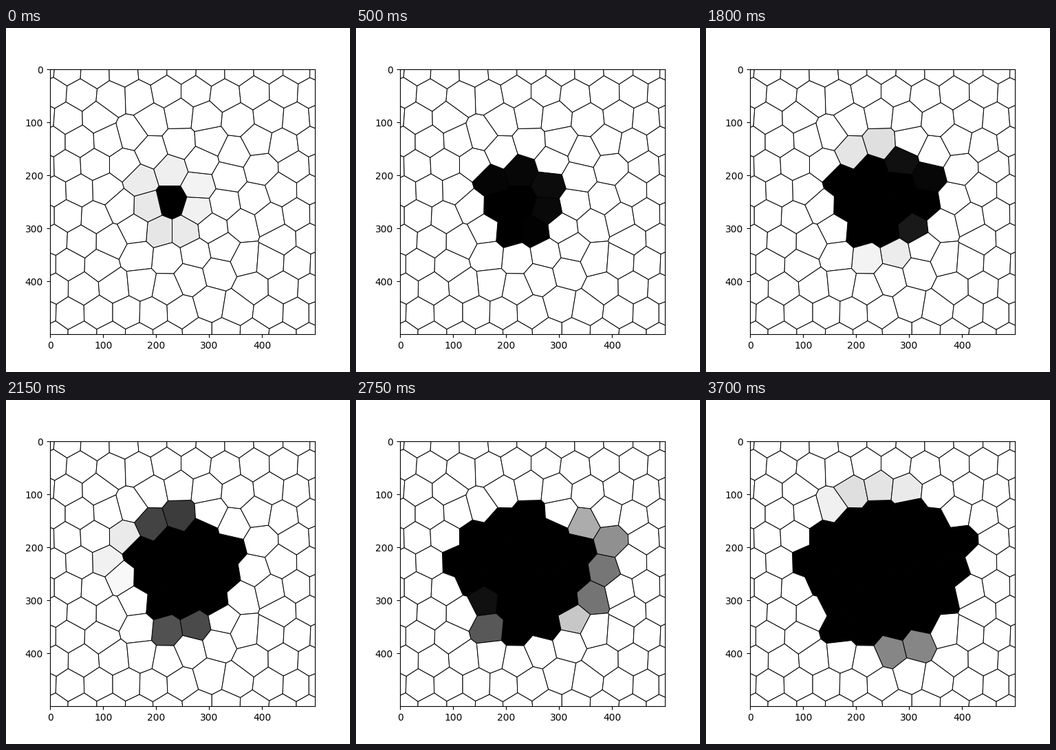
These frames come from a looping animation (500x500 px, 3750 ms). A matplotlib script:

```python
import numpy as np
import matplotlib.pyplot as plt
from matplotlib.animation import FuncAnimation
from matplotlib.collections import PolyCollection

FRAMES, STEP = 75, 50
FADE = 11              # frames a cell needs to turn black
HOLD = (10, 26)        # the growth rests between these frames
LEFT, TOP, SCALE = 63.75, 60, 0.77
PITCH, ROW = 42, 36    # spacing of the loose honeycomb

# waves of growth: first start frame, delay from cell to cell, cell centres
WAVES = [
    (-20, 0, [(240, 252)]),
    (-1.1, 0.1, [(223, 296), (206, 260), (260, 296), (195, 221),
                 (240, 207), (278, 264), (280, 229)]),
    (24.9, 0.4, [(318, 256), (324, 216), (284, 193), (300, 291)]),
    (34.6, 0.3, [(253, 167), (211, 180), (276, 328), (234, 335)]),
    (42.1, 0.3, [(172, 198), (145, 235), (166, 259)]),
    (44.7, 3.1, [(187, 293), (192, 331)]),
    (49.0, 0.1, [(344, 286), (361, 249)]),
    (50.2, 1.2, [(370, 204), (332, 181), (316, 320)]),
    (55.3, 0, [(297, 164)]),
    (68.8, 0, [(267, 364), (309, 354)]),
    (72.6, 0.25, [(212, 133), (252, 125), (290, 129), (182, 154)]),
]


def distances(a, b):
    return np.hypot(a[:, None, 0] - b[None, :, 0], a[:, None, 1] - b[None, :, 1])


def honeycomb(fixed, rng):
    """Jittered honeycomb that leaves room for the fixed cells."""
    pts = np.array([(214 + PITCH * (i + j % 2 / 2), 128 + ROW * j)
                    for j in range(-3, 11) for i in range(-5, 8)], float)
    pts += rng.normal(0, 4, pts.shape)
    return pts[distances(pts, fixed).min(axis=1) > 30]


def relax(fixed, loose, rounds=5):
    """Move the loose sites to the centres of their cells."""
    axis = np.arange(10, 500, 3.0)
    samples = np.array(np.meshgrid(axis, axis)).reshape(2, -1).T
    for _ in range(rounds):
        sites = np.vstack([fixed, loose])
        owner = distances(samples, sites).argmin(axis=1)
        count = np.bincount(owner, minlength=len(sites))
        sums = [np.bincount(owner, s, len(sites)) for s in samples.T]
        centre = np.array(sums).T / np.maximum(count, 1)[:, None]
        centre = np.where(count[:, None] > 0, centre, sites)
        loose = centre[len(fixed):]
    return np.vstack([fixed, loose])


def clip(poly, mid, normal):
    """Keep the part of a polygon on the near side of a line."""
    side = (poly - mid) @ normal
    out = []
    for i in range(len(poly)):
        j = (i + 1) % len(poly)
        if side[i] <= 0:
            out.append(poly[i])
        if side[i] * side[j] < 0:
            t = side[i] / (side[i] - side[j])
            out.append(poly[i] + t * (poly[j] - poly[i]))
    return np.array(out)


def voronoi_cell(k, sites):
    p = sites[k]
    poly = np.array([(-90, -90), (590, -90), (590, 590), (-90, 590)], float)
    poly = poly + 2 * (p - 250) * (np.abs(p - 250) > 300)
    order = np.argsort(np.hypot(*(sites - p).T))
    for q in sites[order[1:25]]:
        poly = clip(poly, (p + q) / 2, q - p)
    return poly


grown = np.array([c for _, _, cells in WAVES for c in cells], float)
start = np.array([t + gap * i for t, gap, cells in WAVES
                  for i in range(len(cells))])
stage = relax(grown, honeycomb(grown, np.random.default_rng(4)))
sites = (stage - (LEFT, TOP)) / SCALE - 0.5

fig, ax = plt.subplots(figsize=(5, 5), dpi=100)
ax.set_xlim(-0.5, 499.5)
ax.set_ylim(499.5, -0.5)
ax.set_aspect("equal")
ax.set_xticks(range(0, 500, 100))
ax.set_yticks(range(0, 500, 100))

web = PolyCollection([voronoi_cell(k, sites) for k in range(len(sites))],
                     edgecolors="black", linewidths=0.72)
ax.add_collection(web, autolim=False)


def update(frame):
    if HOLD[0] <= frame < HOLD[1]:
        frame = HOLD[0]
    shade = np.ones(len(sites))
    shade[:len(start)] = 1 - np.clip((frame - start) / FADE, 0, 1)
    web.set_facecolor(np.repeat(shade[:, None], 3, axis=1))
    return web,


anim = FuncAnimation(fig, update, frames=FRAMES, interval=STEP,
                     init_func=lambda: update(0), repeat=True, repeat_delay=0)
plt.show()
```
